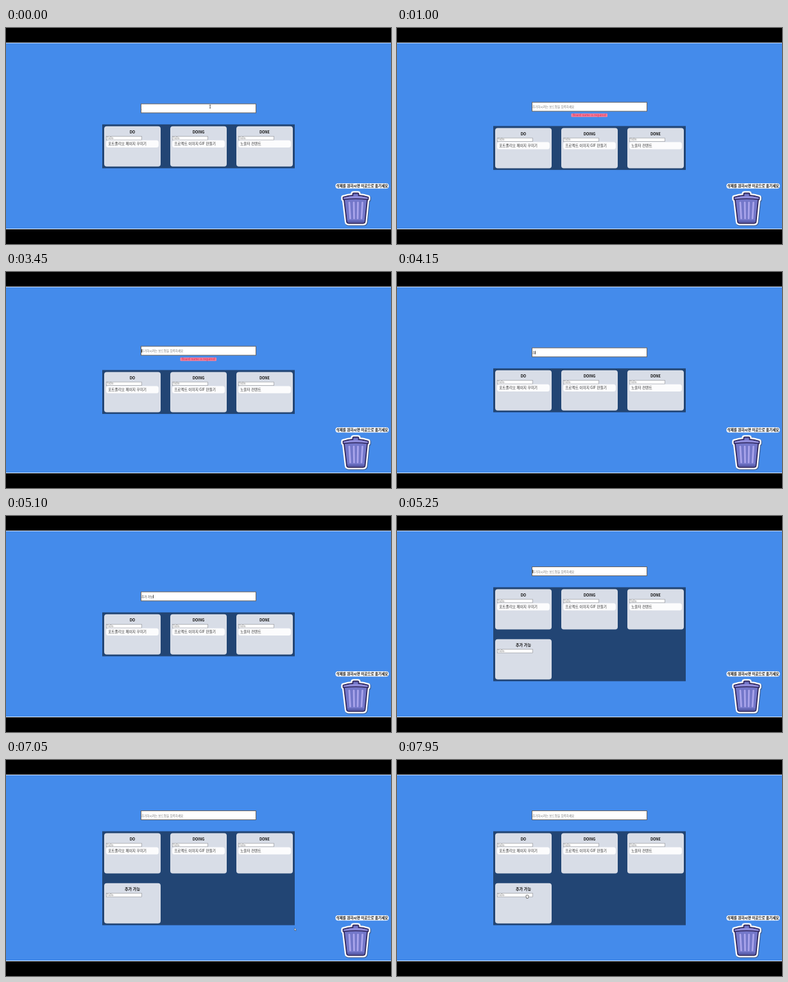
Animation of 600 by 338 pixels, one loop 8000 ms. Source, as an HTML page:

```html
<!DOCTYPE html>
<html lang="ko">
<head>
<meta charset="utf-8">
<style>
  html, body { margin: 0; width: 100%; height: 100%; overflow: hidden; background: #000; }
  svg { display: block; width: 600px; height: 338px; }
  text { font-family: "Noto Sans CJK KR", "Noto Sans CJK JP", "Noto Sans", sans-serif; white-space: pre; }
</style>
</head>
<body>
<svg viewBox="0 0 600 338">
  <rect width="600" height="338"/>
  <rect y="23" width="600" height="292" fill="#448beb"/>
  <path d="M0 23.3H600M0 314.5H600" stroke="#dfe9f8"/>

  <g id="board">
    <rect id="panel" x="150" width="300" fill="#224574"/>
    <g id="columns"></g>
  </g>

  <g id="field">
    <rect x="210.5" y=".5" width="179" height="14" fill="#fff" stroke="#696460"/>
    <text id="entry" x="211" y="9.5" font-size="4.55"></text>
    <rect id="caret" y="5.2" width=".8" height="5.2" fill="#111"/>
  </g>

  <g id="error">
    <rect x="271.5" y="133.7" width="56.5" height="5.6" rx="1" fill="#f5809a"/>
    <text x="299.8" y="138.1" font-size="4.7" text-anchor="middle" fill="#d0224f">Board name is required</text>
  </g>

  <rect x="513.5" y="243" width="83" height="8.2" rx="4" fill="#fff"/>
  <text x="555" y="249.1" font-size="5.5" font-weight="700" text-anchor="middle" fill="#111">삭제를 원하시면 이곳으로 옮기세요</text>

  <defs>
    <path id="can" d="M527 269L531 303Q531.3 305.5 534 305.5H556.500Q559.200 305.500 559.500 303L563 269L564.500 268V264.800Q557 262.400 549.500 262V259.500Q549.500 258.500 548 258.500H542Q540.500 258.500 540.500 259.500V262Q533 262.400 525.500 264.800V268Z"/>
  </defs>
  <g stroke-linejoin="round">
    <use href="#can" x=".8" y=".9" fill="#3c5f96" stroke="#3c5f96" stroke-width="7"/>
    <use href="#can" fill="#fff" stroke="#fff" stroke-width="6.4"/>
    <use href="#can" fill="#7377c9" stroke="#30285f" stroke-width="1.8"/>
    <path d="M526.300 267.500V265.400Q545 260.500 563.700 265.400V267.500Q545 265.500 526.300 267.500Z" fill="#928fdc"/>
    <path d="M525.500 268.500Q545 266 564.500 268.500" fill="none" stroke="#30285f" stroke-width="1.700"/>
    <path d="M535 273L536.500 298M542 273L542.500 298M548.500 273L548 298M555.500 273L554 298" stroke="#aaa5ec" stroke-width="2.700" stroke-linecap="round"/>
    <path d="M532 302.500H558.500" stroke="#555aa9" stroke-width="2"/>
  </g>

  <path id="beam" d="M317.200 120.700H319M318.100 120.700V125.300M317.200 125.300H319" fill="none" stroke="#222" stroke-width=".7"/>
  <path id="arrow" d="M0 0V4L1 3.200L1.700 4.600L2.400 4.200L1.800 2.900H3Z" fill="#fff" stroke="#222" stroke-width=".4"/>
  <path id="hand" d="M-2 0V-1.500Q-1.500-2.500-1-1.500Q-.5-3 0-2Q.5-3 1-1.700Q1.800-2.500 2 -1V1.500L1.200 3H-1.200Z" fill="#eee" stroke="#333" stroke-width=".6"/>
</svg>
<script>
const LOOP = 8000;
const HINT = '추가하시려는 보드명을 입력하세요';
const $ = id => document.getElementById(id);

const column = (x, y, title, task, size = 5.7) => `
  <g transform="translate(${x} ${y})">
    <rect width="88" height="63" rx="4" fill="#d8dde7"/>
    <text x="44" y="11.600" font-size="${size}" font-weight="700" text-anchor="middle" fill="#151515">${title}</text>
    <rect x="3.300" y="15.700" width="55" height="5.600" fill="#fff" stroke="#8b8d92" stroke-width=".6"/>
    <text x="4.300" y="20" font-size="4.200" fill="#777">ToDo</text>
    ${task && `<rect x="3" y="22" width="82" height="11.300" rx="3.500" fill="#fcfcfd"/>
    <text x="6.200" y="29.700" font-size="5.600" fill="#333">${task}</text>`}
  </g>`;

$('columns').innerHTML =
  column(153, 3, 'DO', '포트폴리오 페이지 꾸미기') +
  column(256, 3, 'DOING', '프로젝트 이미지 GIF 만들기') +
  column(359, 3, 'DONE', '노을터 컨텐트') +
  `<g id="added">${column(153, 81.300, '추가 가능', '', 6.100)}</g>`;

// [time, text in the field]
const typing = [
  [0, '.'], [50, ''], [4050, 'ㅊ'], [4150, '추'], [4250, '축'], [4400, '추가'], [4550, '추가 '],
  [4650, '추가 ㄱ'], [4750, '추가 가'], [4850, '추가 간'], [4950, '추가 가느'], [5050, '추가 가능'], [5250, '']
];
const caretOff = [[850, 1350], [1850, 2400], [2950, 3450], [4000, 4050], [5800, 6300], [6850, 7350], [7850, 8000]];
// [time, x, y]
const path = [[6000, 318, 126], [6250, 473, 261.500], [6500, 546, 283], [6850, 546, 283], [7300, 330, 238], [7650, 203, 213.500]];

const show = (id, on) => $(id).setAttribute('visibility', on ? 'visible' : 'hidden');
const move = (id, x, y) => $(id).setAttribute('transform', `translate(${x} ${y})`);

function pointer(t) {
  const i = path.findIndex(p => p[0] > t);
  if (i < 0) return path.at(-1).slice(1);
  if (!i) return path[0].slice(1);
  const [a, b] = [path[i - 1], path[i]];
  const k = (t - a[0]) / (b[0] - a[0]);
  return [1, 2].map(n => a[n] + (b[n] - a[n]) * k);
}

function draw(t) {
  const failed = t >= 300 && t < 4050, added = t >= 5250;
  const [fieldY, boardY] = added ? [79, 111.500] : failed ? [115.700, 153.400] : [118.300, 150.800];
  move('field', 0, fieldY);
  move('board', 0, boardY);
  $('panel').setAttribute('height', added ? 147 : 68.700);
  show('added', added);
  show('error', failed);

  const text = typing.findLast(k => k[0] <= t)[1];
  const entry = $('entry');
  entry.textContent = text || HINT;
  entry.setAttribute('fill', text ? '#333' : '#777');
  $('caret').setAttribute('x', 211 + (text ? entry.getComputedTextLength() : 0));
  show('caret', t >= 50 && !caretOff.some(([a, b]) => t >= a && t < b));

  const [x, y] = pointer(t), grab = x < 241;
  show('beam', t < 50);
  show('arrow', t >= 6000 && !grab);
  show('hand', t >= 6000 && grab);
  move('arrow', x, y);
  move('hand', x, y);
}

const start = performance.now();
function tick() {
  draw((performance.now() - start) % LOOP);
  requestAnimationFrame(tick);
}
tick();
</script>
</body>
</html>
```
